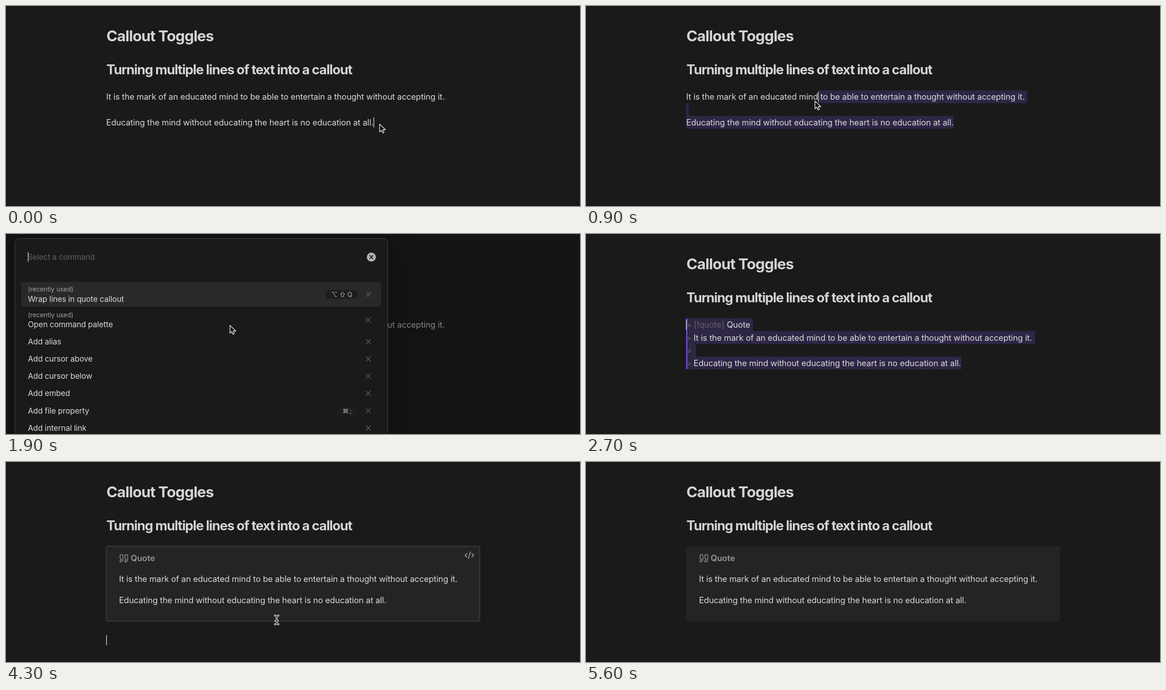
An HTML page that plays this animation: 1266x442 px, repeating every 5.7 s.

```html
<!DOCTYPE html>
<html lang="en">
<head>
<meta charset="utf-8">
<title>Callout Toggles</title>
<style>
  html, body { margin: 0; width: 100%; height: 100%; overflow: hidden; background: #1a1a1a; }
  svg { display: block; }
  text { font: 430 18.3px Inter, "Noto Sans", sans-serif; font-optical-sizing: none;
         letter-spacing: -.11px; fill: #dadada; }
  .h1 { font-size: 33px; font-weight: 700; letter-spacing: -.95px; fill: #d4d4d4; }
  .h2 { font-size: 29.2px; font-weight: 650; letter-spacing: -1.18px; fill: #d4d4d4; }
  .faint { fill: #625f69; }
  .title { font-weight: 600; letter-spacing: 0; fill: #969696; }
  .item, .hint { font-size: 17.2px; }
  .hint { letter-spacing: -.17px; fill: #606060; }
  .note { font-size: 13.8px; letter-spacing: .12px; fill: #a6a6a6; }
  .keys { font: 14px Inter, "DejaVu Sans", sans-serif; letter-spacing: 0; fill: #b3b3b3; }
  .icon { fill: none; stroke-linecap: round; stroke-linejoin: round; }
  #selection rect, #quoted rect { fill: #2e2645; }
  #modal { filter: drop-shadow(0 20px 40px rgba(0, 0, 0, .3)); }
</style>
</head>
<body>
<svg id="stage" width="1266" height="442" viewBox="0 0 1266 442">
  <defs>
    <path id="quoteMark" d="M5 3a2 2 0 0 0-2 2v6a2 2 0 0 0 2 2 1 1 0 0 1 1 1v1a2 2 0 0 1-2 2 1 1 0 0 0-1 1v2a1 1 0 0 0 1 1 6 6 0 0 0 6-6V5a2 2 0 0 0-2-2z"/>
    <path id="beamShape" d="M-4-9.5q3 0 4 2.5q1-2.5 4-2.5M0-7V7M-4 9.5q3 0 4-2.5q1 2.5 4 2.5M-2.5 2h5"/>
  </defs>
  <rect width="1266" height="442" fill="#1a1a1a"/>
  <text class="h1" x="221.5" y="78">Callout Toggles</text>
  <text class="h2" x="221.5" y="151">Turning multiple lines of text into a callout</text>

  <g id="plain">
    <g id="selection"></g>
    <text id="first" x="221" y="207">It is the mark of an educated mind to be able to entertain a thought without accepting it.</text>
    <text id="last" x="221" y="264">Educating the mind without educating the heart is no education at all.</text>
  </g>

  <g id="quoted">
    <rect x="221" y="186.5" width="147" height="28.5"/>
    <rect x="221" y="214.5" width="769.5" height="28.5"/>
    <rect x="221" y="243" width="22" height="28.2"/>
    <rect x="221" y="271" width="606.5" height="28.2"/>
    <path d="M222.2 186.5V299" stroke="#7a52dc" stroke-width="2.4"/>
    <g id="markers"></g>
    <text class="faint" x="238" y="207">[!quote]</text>
    <text x="310.5" y="207">Quote</text>
    <text class="firstCopy" x="237.3" y="235.6"></text>
    <text class="lastCopy" x="237.3" y="292.2"></text>
  </g>

  <g id="callout">
    <rect x="221" y="186.3" width="824" height="165.7" rx="4" fill="#242424"/>
    <g id="hover" class="icon">
      <rect x="221.3" y="186.3" width="823.6" height="165.6" rx="4" stroke="#363636" stroke-width="2.4"/>
      <path transform="translate(1010.7 194.8) scale(.94)" stroke="#a8a8a8" stroke-width="1.75"
            d="M18 16l4-4-4-4M6 8l-4 4 4 4M14.5 4l-5 16"/>
    </g>
    <g class="icon" transform="translate(248.9 202.4) scale(.885)" stroke="#969696" stroke-width="1.75">
      <use href="#quoteMark"/>
      <use href="#quoteMark" x="12"/>
    </g>
    <text class="title" x="275" y="219">Quote</text>
    <text class="firstCopy" x="249.2" y="265"></text>
    <text class="lastCopy" x="249.2" y="312"></text>
  </g>

  <g id="palette">
    <rect width="1266" height="442" fill="#0a0a0a" opacity=".4"/>
    <rect id="modal" x="19.5" y="10" width="822.3" height="600" rx="11" fill="#1a1a1a" stroke="#4b4b4b"/>
    <path d="M20 79.5H841.5" stroke="#222"/>
    <text class="hint" x="48" y="57.4">Select a command</text>
    <circle cx="805.8" cy="51" r="10" fill="#b3b3b3"/>
    <path class="icon" d="M802.3 47.5l7 7m0-7l-7 7" stroke="#1a1a1a" stroke-width="2"/>
    <rect x="34" y="106" width="793" height="54.7" rx="4" fill="#292929"/>
    <g id="items"></g>
  </g>

  <rect id="caret" width="1.3" fill="#e8e8e8"/>
  <path id="arrow" d="M0 0V17.2l4-3.7 2.7 6.2 3-1.3-2.6-5.9h5.7z" fill="#111" stroke="#fff" stroke-width="1.3" stroke-linejoin="round"/>
  <g id="beam" class="icon">
    <use href="#beamShape" stroke="#fff" stroke-width="3.8"/>
    <use href="#beamShape" stroke="#111" stroke-width="1.4"/>
  </g>
  <rect y="440" width="1266" height="2" fill="#131313"/>
</svg>

<script>
const LOOP = 5700, STEP = 100;
const $ = id => document.getElementById(id);
const show = (id, on) => { $(id).style.display = on ? '' : 'none'; };

// Static repeats
for (const name of ['first', 'last'])
  for (const el of document.querySelectorAll(`.${name}Copy`)) el.textContent = $(name).textContent;

$('markers').innerHTML = [0, 1, 2, 3]
  .map(i => `<text class="faint" x="221" y="${207.3 + i * 28.3}">&gt;</text>`).join('');

const keyCap = (x, y, glyphs, xs) =>
  `<rect x="${x}" y="${y - 9.5}" width="${775 - x}" height="19" rx="4" fill="#1d1d1d"/>
   <text class="keys" x="${xs}" y="${y + 5}">${glyphs}</text>`;
const item = (label, baseline, crossY) =>
  `<text class="item" x="48.3" y="${baseline}">${label}</text>
   <path class="icon" d="M794 ${crossY - 5}l10 10m0-10l-10 10" stroke="#666" stroke-width="1.3"/>`;
const recent = (label, y) =>
  `<text class="note" x="48.3" y="${y - 6.5}">(recently used)</text>` + item(label, y + 16, y);
const commands = ['Add alias', 'Add cursor above', 'Add cursor below', 'Add embed', 'Add file property', 'Add internal link'];
$('items').innerHTML =
  keyCap(705.5, 133.5, '⌥⇧Q', '717 735 753') + keyCap(731, 390.5, '⌘;', '742 758') +
  recent('Wrap lines in quote callout', 133.5) + recent('Open command palette', 190) +
  commands.map((label, i) => item(label, 244 + i * 38.15, 237.8 + i * 38.15)).join('');

// Pointer path: [time, x, y]
const pointerPath = [
  [0, 824, 261], [100, 815, 259], [200, 775, 258], [300, 722, 257], [400, 722, 257], [500, 690, 256],
  [600, 645, 250], [700, 655, 214], [800, 567, 211], [900, 505, 210], [1000, 505, 210], [1300, 494, 202],
  [2900, 494, 202], [3300, 540, 240], [3500, 540, 240], [4000, 597, 349], [4400, 597, 349],
  [4900, 700, 372], [5000, 700, 372], [5100, 850, 290], [5200, 1078, 38]
];
// Head of the text selection: [time, line, character]
const selectionSteps = [
  [0, 'last', 70], [200, 'last', 63], [300, 'last', 57], [500, 'last', 54], [600, 'last', 48],
  [700, 'first', 52], [800, 'first', 41], [900, 'first', 34], [1100, 'first', 33], [1200, 'first', 32]
];
const caretOff = [[1500, 1900], [2400, 2700], [3200, 3700], [4600, 5100], [5600, 5700]];
const between = (t, [a, b]) => t >= a && t < b;

function pointerAt(t) {
  const i = pointerPath.findIndex(p => p[0] > t);
  if (i < 0) return pointerPath.at(-1).slice(1);
  const [t0, x0, y0] = pointerPath[i - 1], [t1, x1, y1] = pointerPath[i];
  const k = (t - t0) / (t1 - t0);
  return [x0 + (x1 - x0) * k, y0 + (y1 - y0) * k];
}

const charEnd = (line, count) => $(line).getEndPositionOfChar(count - 1).x;
const bar = (left, right, top) =>
  `<rect x="${left}" y="${top}" width="${Math.max(0, right - left)}" height="28.3"/>`;

function drawSelection(t) {
  const [, line, index] = selectionSteps.findLast(s => s[0] <= t);
  const x = charEnd(line, index), end = charEnd('last', 70);
  $('selection').innerHTML = t >= 1900 ? '' : line === 'last' ? bar(x, end, 243) :
    bar(x, charEnd('first', 90) + 5.5, 186.5) + bar(221, 226.5, 214.8) + bar(221, end, 243);
  return [x, line === 'last' ? 246 : 189.5];
}

function draw(t) {
  const plain = t < 2700, palette = between(t, [1900, 2700]), callout = t >= 4200;
  show('plain', plain);
  show('palette', palette);
  show('quoted', !plain && !callout);
  show('callout', callout);

  let caret = plain ? drawSelection(t) : callout ? [221, 382.5] : [220.6, 189.5];
  if (palette) caret = [48.2, 40];
  $('caret').setAttribute('x', caret[0]);
  $('caret').setAttribute('y', caret[1]);
  $('caret').setAttribute('height', palette ? 21.5 : 22.5);
  show('caret', !caretOff.some(span => between(t, span)));

  const [x, y] = pointerAt(t);
  $('arrow').setAttribute('transform', `translate(${x} ${y})`);
  $('beam').setAttribute('transform', `translate(${x} ${y})`);
  show('arrow', plain);
  show('beam', between(t, [3000, 5300]));
  show('hover', t < 5300 && between(x, [221, 1045]) && between(y, [186, 352]));
}

function tick() {
  draw(Math.floor(performance.now() % LOOP / STEP) * STEP);
  requestAnimationFrame(tick);
}
tick();
</script>
</body>
</html>
```
